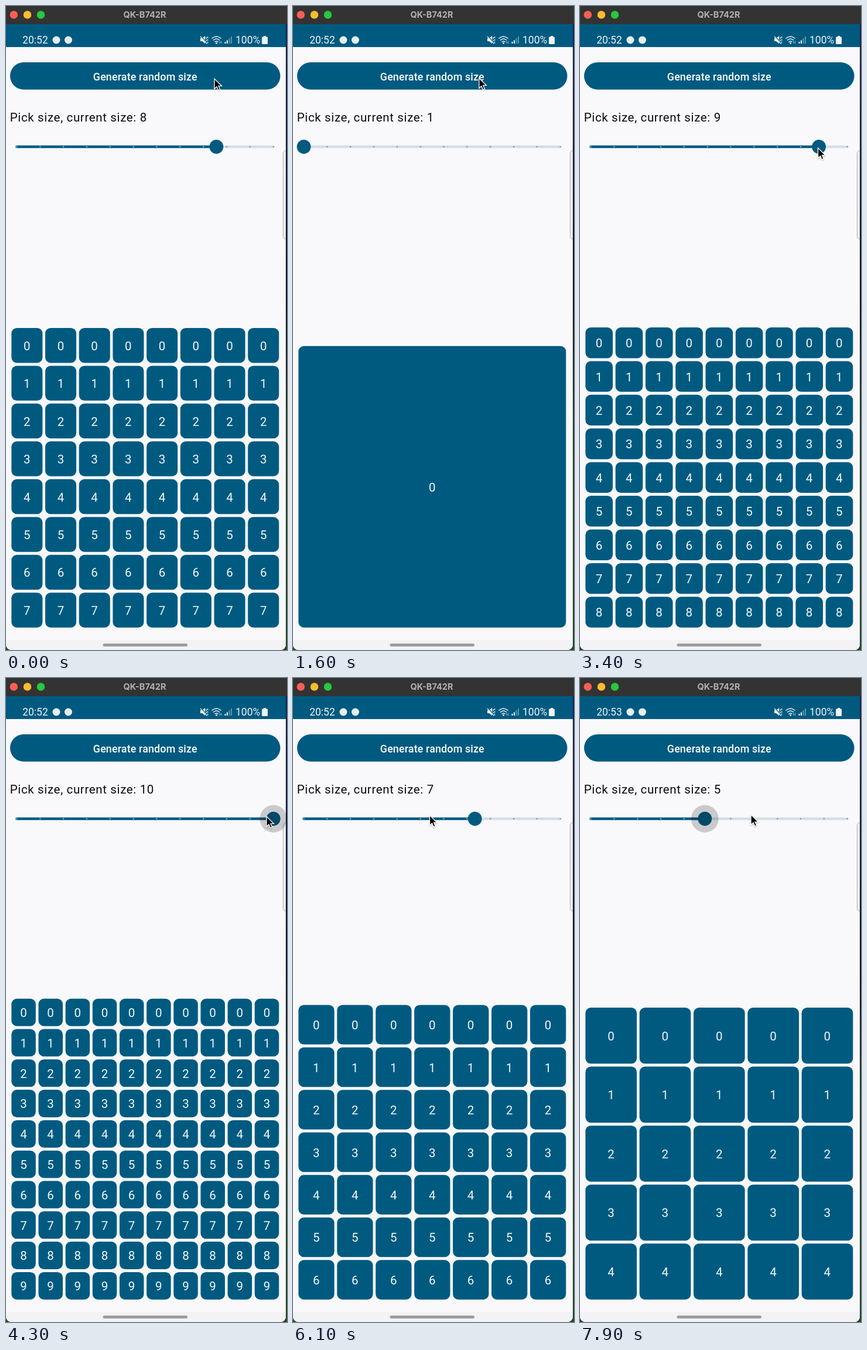
Recreate the animation shown at these times as an HTML page. Size 480 px wide and 1098 px high, loop 8000 ms.

```html
<!DOCTYPE html>
<html lang="en">
<head>
<meta charset="utf-8">
<title>Random grid size</title>
<style>
  html, body { margin: 0; width: 100%; height: 100%; overflow: hidden; background: #0c1230; }
  svg { display: block; width: 480px; height: 1098px; font-family: Roboto, "Noto Sans", sans-serif; }
  .body { font-size: 20.5px; letter-spacing: .64px; }
  .status { font-size: 17.5px; fill: #eef5f8; }
  .digit { fill: #f4f8fa; text-anchor: middle; }
</style>
</head>
<body>
<svg viewBox="0 0 480 1098" xmlns="http://www.w3.org/2000/svg">
  <defs>
    <linearGradient id="desk" x2="0" y2="1">
      <stop offset="0" stop-color="#14225a"/>
      <stop offset=".45" stop-color="#0d1226"/>
      <stop offset=".65" stop-color="#1d3d22"/>
      <stop offset="1" stop-color="#1d4a20"/>
    </linearGradient>
    <clipPath id="window"><rect width="478" height="1098" rx="9"/></clipPath>
    <filter id="shade" x="-50%" y="-50%" width="200%" height="200%">
      <feDropShadow dx="0" dy="1" stdDeviation="1" flood-opacity=".35"/>
    </filter>
  </defs>
  <rect width="480" height="1098" fill="url(#desk)"/>
  <g clip-path="url(#window)">
    <rect width="478" height="1098" fill="#f9f8fb"/>
    <rect y="1081" width="478" height="17" fill="#f3f2f4"/>
    <rect y="31" width="478" height="39" fill="#005a80"/>
    <rect x="473.5" y="246.5" width="14" height="151" rx="5" fill="#f3f2f4" stroke="#a9a8aa"/>
    <rect x="165.500" y="1087" width="144.500" height="5" rx="2.500" fill="#9d9c9e"/>
  </g>
  <rect width="480" height="31" fill="#323332"/>
  <circle cx="13.300" cy="15" r="6.800" fill="#fe5f57"/>
  <circle cx="36.500" cy="15" r="6.800" fill="#febc2e"/>
  <circle cx="59.500" cy="15" r="6.800" fill="#28c840"/>
  <text x="237" y="20" text-anchor="middle" fill="#b3b2b3" font-family="Inter, sans-serif" font-size="14.500" font-weight="700">QK-B742R</text>

  <text id="clock" class="status" x="28.200" y="64"></text>
  <circle cx="86" cy="58" r="6.500" fill="#e6f0f4"/>
  <circle cx="106.500" cy="58" r="6.500" fill="#e6f0f4"/>
  <g fill="#eef5f8">
    <path d="M332 55h3l5-4v13l-5-4h-3z"/>
    <path d="M342 53v10M344.500 52v12" stroke="#eef5f8" stroke-width="1.300" stroke-dasharray="3 1.500"/>
    <path d="M332.500 51.500l11.500 13" stroke="#005a80" stroke-width="2.600"/>
    <path d="M332 52l11.500 12.500" stroke="#eef5f8" stroke-width="1.300"/>
  </g>
  <g fill="none" stroke="#eef5f8" stroke-width="1.500">
    <path d="M351.500 55.500q8-7 16 0M354 58.500q5.500-5 11 0M356.500 61.300q3-2.600 6 0"/>
    <path d="M365 64v-4M367.500 60v4" stroke-width="1" opacity=".7"/>
  </g>
  <circle cx="359.500" cy="63.300" r="1.500" fill="#eef5f8"/>
  <path d="M374.500 64v-3M378 64v-5.500" stroke="#eef5f8" stroke-width="2"/>
  <path d="M381.500 64v-9M385 64v-12" stroke="#eef5f8" stroke-width="2" opacity=".4"/>
  <text class="status" x="392" y="64">100%</text>
  <path d="M440 51h4v1.500h1.500q1.500 0 1.500 1.500v9.500q0 1.500-1.500 1.500h-7q-1.500 0-1.500-1.500v-9.500q0-1.500 1.500-1.500h1.500z" fill="#eef5f8"/>

  <rect x="7" y="96" width="461.500" height="46.500" rx="23.250" fill="#005a80"/>
  <rect id="press" x="7" y="96" width="461.500" height="46.500" rx="23.250" fill="#fff" opacity=".11"/>
  <text x="237.800" y="126.500" text-anchor="middle" fill="#fff" font-size="17.900" font-weight="500" letter-spacing=".13">Generate random size</text>

  <text id="label" class="body" x="6.800" y="197" fill="#0c0c0e"></text>
  <g stroke-width="4.600" stroke-linecap="round">
    <path d="M18.500 240H456.500" stroke="#d3dfe5"/>
    <path id="active" stroke="#005a80"/>
  </g>
  <g id="ticks"></g>
  <circle id="thumb" cy="240" r="11.900" fill="#005a80"/>
  <circle id="halo" cy="240" r="23.400" opacity=".19"/>

  <g id="grid"></g>
  <path id="cursor" d="M0 0V17.200L4 13.500L6.700 19.700L9.600 18.500L7 12.400H12.400Z" fill="#000" stroke="#fff" stroke-width="1.300" filter="url(#shade)"/>
</svg>
<script>
const LOOP = 8000, STEP = 100;
const LEFT = 9.3, WIDTH = 457, BOTTOM = 1059.7, GAP_X = 4.65, GAP_Y = 5;
const HEIGHTS = [480, 484.5, 489, 493, 497.6, 500, 502.3, 510.8, 511.7, 513];
const TICKS = 12;

// [time, size]
const sizes = [[0, 8], [200, 4], [700, 1], [2900, 9], [3900, 10], [4400, 9], [4700, 7],
  [5000, 6], [5300, 5], [5500, 6], [5700, 7], [6400, 5], [6700, 4], [7000, 3], [7300, 4], [7600, 5]];
// [time, x, y] of the pointer tip
const path = [[0, 356, 124], [200, 356, 124], [300, 352, 120], [400, 352, 120], [700, 345.5, 116],
  [1400, 325, 121], [2100, 300, 128], [2800, 285, 131], [3000, 310, 150], [3400, 406.500, 242],
  [3600, 408, 240], [4000, 455, 238], [4300, 445, 236], [4700, 342.5, 235], [5000, 298, 235],
  [5300, 262, 235], [5700, 318, 235], [6100, 233.500, 234], [6400, 214, 234], [6900, 150, 234],
  [7200, 165, 234], [7600, 255, 233], [7900, 292, 233]];
const presses = [[200, 300], [600, 800], [1700, 1900], [2700, 2900]];
const drags = [[3600, 5800], [6300, LOOP]];

const $ = id => document.getElementById(id);
const within = (spans, t) => spans.some(([a, b]) => t >= a && t < b);
const show = (node, on) => node.setAttribute("visibility", on ? "visible" : "hidden");
const sliderX = n => 18.5 + (n - 1) * 48.7;
const gridTop = n => BOTTOM - HEIGHTS[n - 1];

function add(parent, tag, attrs, text) {
  const node = document.createElementNS("http://www.w3.org/2000/svg", tag);
  for (const key in attrs) node.setAttribute(key, attrs[key]);
  if (text !== undefined) node.textContent = text;
  parent.appendChild(node);
  return node;
}

function pointerAt(t) {
  const i = path.findIndex(p => p[0] > t);
  if (i < 0) return path[path.length - 1].slice(1);
  const [t0, x0, y0] = path[i - 1], [t1, x1, y1] = path[i];
  const k = (t - t0) / (t1 - t0);
  return [x0 + (x1 - x0) * k, y0 + (y1 - y0) * k];
}

function buildGrid(n) {
  const grid = $("grid");
  grid.textContent = "";
  const w = (WIDTH - (n - 1) * GAP_X) / n;
  const h = (HEIGHTS[n - 1] - (n - 1) * GAP_Y) / n;
  for (let row = 0; row < n; row++) {
    for (let col = 0; col < n; col++) {
      const x = LEFT + col * (w + GAP_X), y = row * (h + GAP_Y);
      add(grid, "rect", { x, y, width: w, height: h, rx: 9.3, fill: "#005a80" });
      add(grid, "text", { x: x + w / 2 + .2, y: y + h / 2 + 8, class: "body digit" }, row);
    }
  }
}

const ticks = Array.from({ length: TICKS }, (_, i) =>
  add($("ticks"), "circle", { cx: 18.5 + i * 39.83, cy: 240, r: 1.2 }));
let shown = 0;

function render(time) {
  const t = Math.floor(time % LOOP / STEP) * STEP;
  const i = sizes.findLastIndex(s => s[0] <= t);
  const [since, n] = sizes[i];
  if (n !== shown) buildGrid(shown = n);

  // A new grid keeps the previous top for one step before it settles.
  const settling = i > 0 && t - since < STEP;
  $("grid").setAttribute("transform", `translate(0 ${gridTop(settling ? sizes[i - 1][1] : n)})`);

  const x = sliderX(n);
  $("thumb").setAttribute("cx", x);
  $("halo").setAttribute("cx", x);
  $("active").setAttribute("d", `M18.5 240H${x}`);
  ticks.forEach(dot => dot.setAttribute("fill", +dot.getAttribute("cx") < x ? "#8fb4c5" : "#7e98a4"));
  show($("halo"), within(drags, t));
  show($("press"), within(presses, t));
  $("label").textContent = `Pick size, current size: ${n}`;
  $("clock").textContent = t < 7000 ? "20:52" : "20:53";
  $("cursor").setAttribute("transform", `translate(${pointerAt(t).join(" ")})`);
}

const start = performance.now();
function tick() {
  render(performance.now() - start);
  requestAnimationFrame(tick);
}
tick();
</script>
</body>
</html>
```
